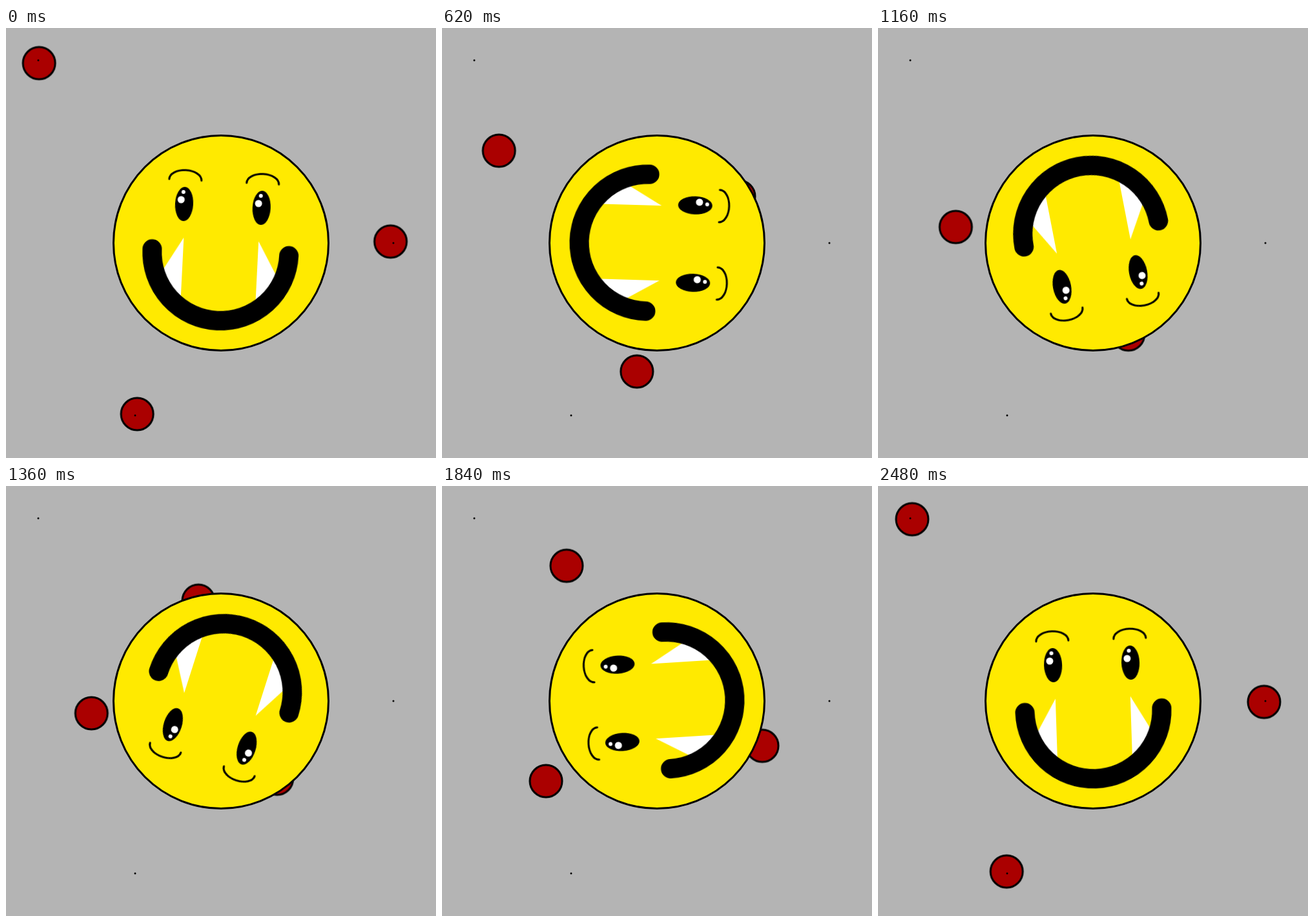
An HTML page that plays this animation: 666x666 px, repeating every 2.5 s.

```html
<!DOCTYPE html>
<html lang="en">
<head>
<meta charset="utf-8">
<title>Rolling smiley</title>
<style>
  html, body { margin: 0; width: 100%; height: 100%; overflow: hidden; background: #b4b4b4; }
  svg { display: block; width: 100vw; height: 100vh; }
  .line { fill: none; stroke: #000; stroke-width: 3; stroke-linecap: round; }
  .ball { fill: #a00; stroke: #000; stroke-width: 3; }
  .shine { fill: #fff; }
</style>
</head>
<body>
<svg viewBox="0 0 666 666">
  <defs>
    <g id="eye">
      <path class="line" d="M-25-95a25 15 0 0 1 50 0"/>
      <ellipse cy="-57.6" rx="14" ry="26.5"/>
      <circle class="shine" cx="-5" cy="-64" r="5.5"/>
      <circle class="shine" cx="-2" cy="-76" r="3"/>
    </g>
    <path id="fang" class="shine" d="M58-5.6L93 55L58 101Z"/>
  </defs>
  <g id="balls"></g>
  <g id="dots"></g>
  <g transform="translate(333 333)">
    <circle r="166.5" fill="#ffea00" stroke="#000" stroke-width="3"/>
    <g id="face">
      <use href="#eye" x="-60"/>
      <use href="#eye" x="60"/>
      <use href="#fang"/>
      <use href="#fang" transform="scale(-1 1)"/>
      <path d="M-106 14.5A106 106 0 0 0 106 14.5" fill="none" stroke="#000" stroke-width="30" stroke-linecap="round"/>
    </g>
  </g>
</svg>
<script>
  const STEPS = 125, STEP_MS = 20, TURN = 0.05;
  const first = TURN, last = TURN * (STEPS + 1);
  const corners = [[50, 50], [200, 600], [600, 333]];

  const add = (parent, cls, r) => {
    const c = document.createElementNS('http://www.w3.org/2000/svg', 'circle');
    c.setAttribute('r', r);
    if (cls) c.setAttribute('class', cls);
    return document.getElementById(parent).appendChild(c);
  };

  // pose(angle) returns a transform that is linear in the angle
  const play = (el, pose) => el.animate(
    [{ transform: pose(first) }, { transform: pose(last) }],
    { duration: STEPS * STEP_MS, iterations: Infinity, easing: `steps(${STEPS}, end)` }
  ).startTime = 0;

  play(document.getElementById('face'), a => `rotate(${a}rad)`);

  // each ball travels to the next corner during one full turn
  corners.forEach(([x, y], i) => {
    const [nx, ny] = corners[(i + 1) % corners.length];
    play(add('balls', 'ball', 25), a => {
      const p = a / (2 * Math.PI);
      return `translate(${x + (nx - x) * p}px, ${y + (ny - y) * p}px)`;
    });
    const dot = add('dots', '', 1.5);
    dot.setAttribute('cx', x);
    dot.setAttribute('cy', y);
  });
</script>
</body>
</html>
```
